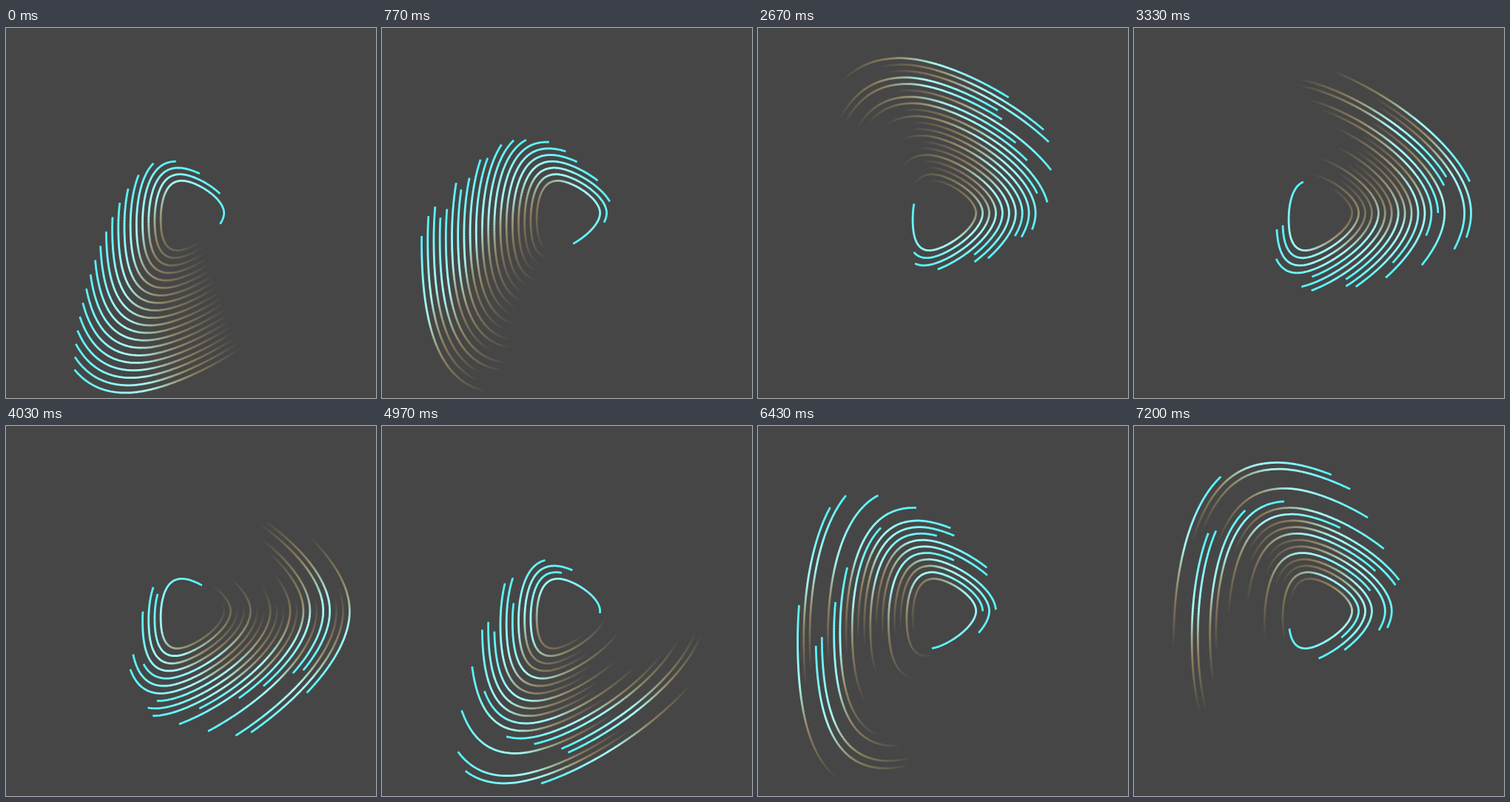
An HTML page with a canvas that plays this animation: 500 px wide and 500 px high, repeating every 7.23 s.

```html
<!DOCTYPE html>
<html lang="en">
<head>
<meta charset="utf-8">
<title>Orbiting trails</title>
<style>
  html, body { margin: 0; width: 100%; height: 100%; overflow: hidden; background: #464646; }
  canvas { display: block; width: 500px; height: 500px; }
</style>
</head>
<body>
<canvas id="stage"></canvas>
<script>
const LOOP = 7230, FPS = 30;
const CENTER = 250, INNER = 5, OUTER = 24;   // ring sizes
const TRAIL = 247;                           // trail length in pixels, equal on every ring
const START = 243;                           // tail position at time 0 on the largest ring
const PIECES = 62;

const GROUND = [70, 70, 70], SAND = [198, 170, 112], ICE = [165, 250, 250], CYAN = [82, 245, 255];

// Largest ring, relative to the centre, clockwise from its rightmost point
const OUTLINE = `M214.4 0 C214.4 106 6 243 -88 243 C-160 243 -196.4 180 -196.4 40
  C-196.4 -30 -184 -111.6 -150 -161 C-127.3 -193.9 -98 -209.3 -58 -209.3
  C32 -209.3 214.4 -96 214.4 0 Z`;

const path = document.createElementNS('http://www.w3.org/2000/svg', 'path');
path.setAttribute('d', OUTLINE);
const total = path.getTotalLength();
const SAMPLES = 1400;
const samples = Array.from({ length: SAMPLES }, (_, i) => path.getPointAtLength(total * i / SAMPLES));

const canvas = document.getElementById('stage');
const ctx = canvas.getContext('2d');
const ratio = window.devicePixelRatio || 1;
canvas.width = canvas.height = 500 * ratio;

const mix = (a, b, k) => a + (b - a) * k;
const mixColor = (a, b, k) => a.map((v, i) => mix(v, b[i], k));
const ramp = (from, to, v) => Math.min(1, Math.max(0, (v - from) / (to - from)));
const smooth = k => k * k * (3 - 2 * k);

// The trail fades in as sand, cools to ice and ends in cyan; p runs from tail to head
function colorAt(p) {
  const cool = mixColor(SAND, ICE, smooth(ramp(0.25, 0.62, p)));
  const bright = mixColor(cool, CYAN, ramp(0.62, 1, p));
  return `rgb(${mixColor(GROUND, bright, ramp(0, 0.55, p)).map(Math.round)})`;
}

const colors = Array.from({ length: PIECES }, (_, i) => colorAt((i + 0.5) / PIECES));

// Seconds per turn: rings repeat in threes, and two of each three slow down in waves
function periodOf(size) {
  const wave = peak => 0.5 + 0.5 * Math.cos((size - peak) * Math.PI / 7);
  const delays = [
    () => 0.33 + 0.64 * wave(20),
    () => 0.1,
    () => 0.055 * size * wave(18.8) ** 2
  ];
  return 4.93 + delays[size % 3]();
}

// Point on a ring; distance is measured along the largest ring
function pointAt(distance, scale) {
  const f = (distance / total % 1) * SAMPLES;
  const i = Math.floor(f), k = f - i;
  const a = samples[i % SAMPLES], b = samples[(i + 1) % SAMPLES];
  return [CENTER + mix(a.x, b.x, k) * scale, CENTER + mix(a.y, b.y, k) * scale];
}

function drawTrail(size, seconds) {
  const scale = size / OUTER;
  const tail = START + total * seconds / periodOf(size);
  const step = TRAIL / PIECES / scale;
  for (let i = 0; i < PIECES; i++) {
    const from = tail + i * step;
    // A short overlap hides the seams between pieces
    const lead = i ? 0.5 / scale : 0;
    ctx.strokeStyle = colors[i];
    ctx.beginPath();
    ctx.moveTo(...pointAt(from - lead, scale));
    ctx.lineTo(...pointAt(from + step / 2, scale));
    ctx.lineTo(...pointAt(from + step, scale));
    ctx.stroke();
  }
}

function render(ms) {
  // Motion advances in whole frames, as if shot at 30 per second
  const seconds = Math.floor((ms % LOOP + 3.4) * FPS / 1000) / FPS;
  ctx.setTransform(ratio, 0, 0, ratio, 0, 0);
  ctx.fillStyle = `rgb(${GROUND})`;
  ctx.fillRect(0, 0, 500, 500);
  ctx.lineWidth = 2.75;
  for (let size = INNER; size <= OUTER; size++) drawTrail(size, seconds);
}

function tick(now) {
  render(Math.max(0, now));
  requestAnimationFrame(tick);
}
render(0);
requestAnimationFrame(tick);
</script>
</body>
</html>
```
